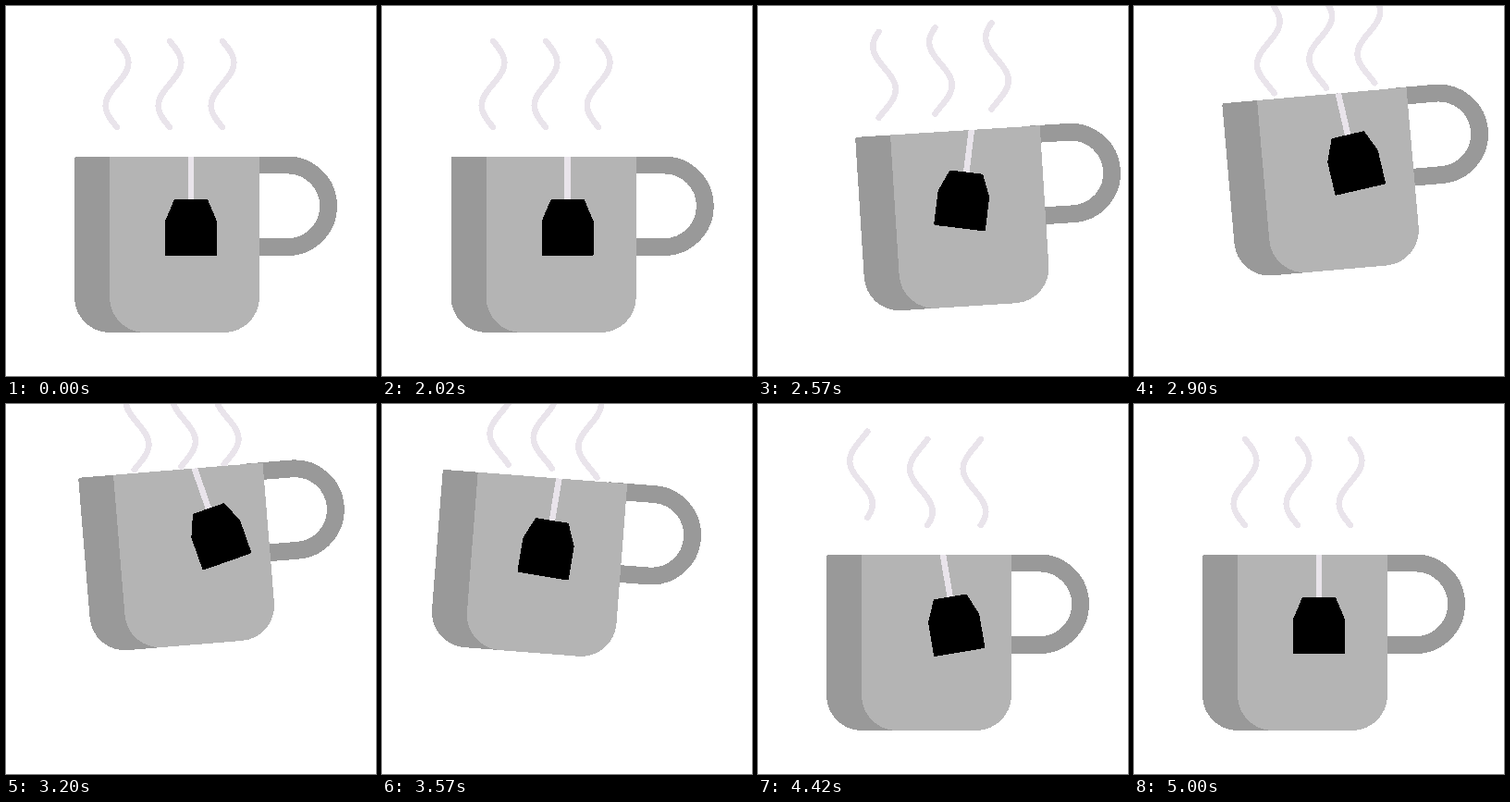
An HTML page for the animation above (5200 ms loop, 400x400 px).

```html
<!DOCTYPE html>
<html lang="en">
<head>
<meta charset="utf-8">
<title>Tea cup</title>
<style>
  html, body { margin: 0; width: 100%; height: 100%; overflow: hidden; background: #fff; }
  svg { display: block; width: 100%; height: 100%; shape-rendering: crispEdges; }
  .line { fill: none; stroke: #e9e4eb; stroke-width: 6.5; }
</style>
</head>
<body>
<svg viewBox="0 0 400 400">
  <g id="steam"></g>
  <g id="cup">
    <path d="M254 172H304.3a44.3 44.3 0 0 1 0 88.6H254" fill="none" stroke="#999" stroke-width="18.8"/>
    <path d="M76 163H160V353H112a38 38 0 0 1-38-38V165a2 2 0 0 1 2-2Z" fill="#999"/>
    <path d="M112 163H274V315a38 38 0 0 1-38 38H150a38 38 0 0 1-38-38Z" fill="#b4b4b4"/>
    <g id="bag">
      <path class="line" d="M200 163V212"/>
      <path d="M183 210.5H217L226.5 233V268.5H173.5V233Z" stroke="#000" stroke-width="3" stroke-linejoin="round"/>
    </g>
  </g>
</svg>
<script>
const LOOP = 5200, START = 2000, END = 5000;
const byId = id => document.getElementById(id);

// Smooth step from 0 to 1 between two times.
function ease(t, from, to) {
  const u = Math.min(1, Math.max(0, (t - from) / (to - from)));
  return u * u * (3 - 2 * u);
}

// Eases from zero through [time, value] stops, resting at each one.
function glide(t, from, ...stops) {
  let value = 0;
  for (const [time, next] of stops) {
    if (t < time) return value + (next - value) * ease(t, from, time);
    from = time;
    value = next;
  }
  return value;
}

// Goes from 0 to 1 at constant speed, with a short ramp at both ends.
function cruise(u, ramp) {
  if (u <= 0) return 0;
  if (u > 0.5) return 1 - cruise(1 - u, ramp);
  return (u < ramp ? u * u / (2 * ramp) : u - ramp / 2) / (1 - ramp);
}

const cup = t => ({
  x: glide(t, 1970, [2570, 33.2], [3740, -14.1], [4050, 0]),
  y: -96 * (ease(t, 2144, 3311) - ease(t, 3370, 4225)),
  turn: -5 * ease(t, START, 2870) + 10 * ease(t, 3150, 3641) - 5 * ease(t, 3978, 4300)
});

const bagTurn = t => glide(t, START, [2550, 10.7], [3100, -16], [4000, 23.2], [4450, -10], [END, 0]);

// Wisps follow the cup; the further left, the later.
const wisps = [2, 1, 0].map(lag => {
  const path = document.createElementNS("http://www.w3.org/2000/svg", "path");
  path.setAttribute("class", "line");
  path.setAttribute("stroke-linecap", "round");
  byId("steam").append(path);
  return {
    path,
    x: t => 234 - 57 * lag + glide(t, START,
      [2650 + 150 * lag, 25.5], [3650 + 300 * lag, -10], [4050 + 450 * lag, 0]),
    y: t => 38 - 68 * (ease(t, 2160 + 65 * lag, 3320 + 65 * lag)
      - ease(t, 3320 + 50 * lag, 4100 + 300 * lag))
  };
});

function wave(x, y, phase) {
  const steps = 40, points = [];
  for (let i = 0; i <= steps; i++) {
    const s = i / steps;
    const sway = 12.3 * Math.sin(2 * Math.PI * (s + phase));
    points.push((x + sway).toFixed(2) + " " + (y + 93 * s).toFixed(2));
  }
  return "M" + points.join("L");
}

function draw(t) {
  const { x, y, turn } = cup(t);
  byId("cup").setAttribute("transform", `translate(${x} ${y}) rotate(${turn} 200 200)`);
  byId("bag").setAttribute("transform", `rotate(${bagTurn(t)} 200 163)`);
  const phase = 4 * cruise((t - START) / (END - START), 0.127);
  for (const w of wisps) w.path.setAttribute("d", wave(w.x(t), w.y(t), phase));
}

const start = performance.now();
function tick() {
  const t = (performance.now() - start) % LOOP;
  draw(t < START ? 0 : t);
  requestAnimationFrame(tick);
}
tick();
</script>
</body>
</html>
```
